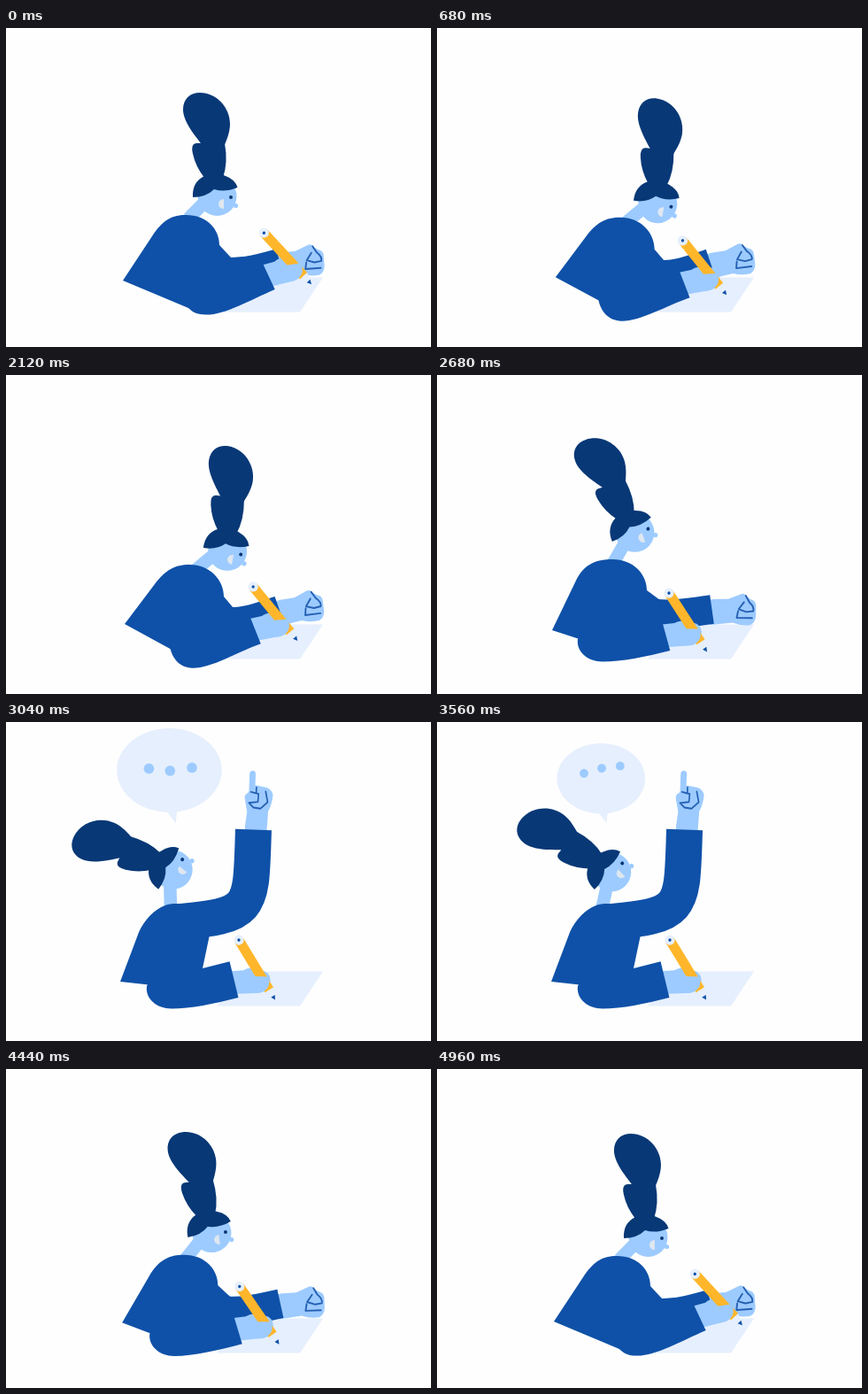
These frames come from a looping animation (480x360 px, 5000 ms). An HTML page:

```html
<!DOCTYPE html>
<html lang="en">
<head>
<meta charset="utf-8">
<title>Writing and raising a hand</title>
<style>
html, body { margin: 0; width: 100%; height: 100%; overflow: hidden; background: #fefefe; }
svg { display: block; width: 100vw; height: 100vh; }
.blue { fill: #0f51a8; }
.navy { fill: #083876; }
.skin { fill: #9dcbff; }
.pale { fill: #e6effd; }
.line { fill: none; stroke: #2560b2; stroke-width: 1.9; stroke-linecap: round; stroke-linejoin: round; }
</style>
</head>
<body>
<svg viewBox="0 0 480 360">
  <path class="pale" d="M265 281.5H358L332 320.5H238Z"/>

  <g id="bubble">
    <ellipse class="pale" cx="185.3" cy="63.8" rx="49.8" ry="39.8"/>
    <path class="pale" d="M179 98L191.5 114L193 98Z"/>
    <circle class="skin dot" cx="166" r="4.9"/>
    <circle class="skin dot" cx="186" r="4.9"/>
    <circle class="skin dot" cx="206.8" r="4.9"/>
  </g>

  <path id="neck" fill="none" stroke="#9dcbff" stroke-width="14.5"/>
  <g id="head">
    <circle class="skin" cx="238.5" cy="190" r="22"/>
    <circle class="skin" cx="259.5" cy="200.5" r="2.6"/>
    <path fill="#dfe7ef" d="M246 193V204A6 5.5 0 0 1 246 193Z"/>
    <circle class="navy" cx="254" cy="191" r="2"/>
    <path class="navy" d="M211 191Q210 174 224 167Q237 161 248 167Q259 171 261.5 180Q247 186 235 182Q226 191 211 191Z"/>
    <g id="hair" class="navy">
      <path d="M224 169Q214 156 211 142Q208 129 217 130L247 130Q251 152 245 169Z"/>
      <path d="M223 134C214 122 200 106 200 92C200 80 208 73 219 73C238 73 253 90 253 108C253 118 249 127 246 134Z"/>
    </g>
  </g>

  <g id="fist">
    <path id="finger" fill="none" stroke="#9dcbff" stroke-width="7.8" stroke-linecap="round"/>
    <path class="skin" d="M-4 -11H4L20 -9L35 -12.5Q39 -13.5 41 -9L45 -5Q50 -3 50 2L48 15Q46 22 40 23.5Q30 23 21 18L-4 17Z"/>
    <path id="curled" class="line" d="M40 -10L43 -2Q48 4 46 8.5L38 8.3L30 4L37 -3M29 6L26.4 13.3L43.5 16"/>
    <path id="pointing" class="line" d="M48 2L41 2M42.5 -5L40.5 5L31.5 4.5L30 -7L25 -1L24 8L31.5 17L43.5 14"/>
  </g>
  <path id="farArm" fill="none" stroke="#0f51a8"/>
  <path id="torso" class="blue"/>

  <g id="hand">
    <path class="skin" d="M252 282L268 280Q276 275 284 279Q294 278 298 285Q301 293 296 299Q292 305 283 305L262 307L250 300Z"/>
    <g transform="translate(304 309) rotate(55.7)">
      <rect x="-76" y="-5.5" width="66" height="11" fill="#ffb62a"/>
      <path class="pale" d="M-10 -5.5L-2 -2.4V2.4L-10 5.5Z"/>
      <path class="blue" d="M-2 -2.6L3 0L-2 2.6Z"/>
      <circle class="pale" cx="-76" r="5.6"/>
      <circle class="blue" cx="-76" r="1.7"/>
    </g>
    <path class="skin" d="M279 286L296 286Q300 293 296 299Q292 305 282 305Z"/>
  </g>
  <path id="nearArm" class="blue"/>
</svg>

<script>
const LOOP = 5000;
const $ = id => document.getElementById(id);
const dots = document.querySelectorAll('.dot');
const set = (id, name, value) => $(id).setAttribute(name, value);
const mix = (a, b, k) => a + (b - a) * k;
const mixPt = (a, b, k) => a.map((v, i) => mix(v, b[i], k));
const clamp = v => Math.min(1, Math.max(0, v));
const pt = (...v) => v.flat().map(n => n.toFixed(2)).join(' ');
const add = (p, x, y) => [p[0] + x, p[1] + y];
const polar = (deg, r) => [r * Math.cos(deg * Math.PI / 180), r * Math.sin(deg * Math.PI / 180)];

function turn([x, y], deg) {
  const [c, s] = polar(deg, 1);
  return [x * c - y * s, x * s + y * c];
}

// Smooth curve through [time, value] keys that never overshoots them
function track(keys) {
  const rate = i => (keys[i + 1][1] - keys[i][1]) / (keys[i + 1][0] - keys[i][0]);
  const slope = keys.map((k, i) => {
    if (i === 0 || i === keys.length - 1) return 0;
    const a = rate(i - 1), b = rate(i);
    return a * b > 0 ? 2 * a * b / (a + b) : 0;
  });
  return t => {
    let i = 0;
    while (i < keys.length - 2 && t > keys[i + 1][0]) i++;
    const [t0, v0] = keys[i], [t1, v1] = keys[i + 1];
    const h = t1 - t0, u = clamp((t - t0) / h), w = 1 - u;
    return v0 * w * w * (1 + 2 * u) + v1 * u * u * (3 - 2 * u)
      + h * u * w * (slope[i] * w - slope[i + 1] * u);
  };
}

const tilt = track([[0, 0], [420, 9.8], [610, 9.8], [1130, 0], [1500, 10], [2280, 10],
  [2680, -19.5], [2800, -37], [2980, -52], [3300, -43.5], [3960, -43.5],
  [4440, -8], [4650, -1.5], [5000, 0]]);
const sway = track([[2280, 0], [2680, 1.5], [2800, 1], [3040, -13], [3300, -7],
  [3700, -8.5], [3960, -8], [4200, 5], [4440, 1.5], [4700, 0]]);
const write = track([[0, 1], [360, 0], [390, 0], [940, 1], [1120, 1], [1470, 0],
  [1540, 0], [2020, 0.6], [2200, 0.6], [2560, 0], [4330, 0], [4980, 1]]);
const raise = track([[2690, 0], [2840, 0.3], [3080, 1.04], [3300, 1], [3970, 1], [4390, 0]]);

// Body points for four tilts of the head
const poses = [
  { a: 10, mid: [248.5, 193.5], back: [134, 281], blade: [168, 236], top: [207, 214],
    side: [246, 250], notch: [256, 262], base: [200, 317], nape: [214, 220] },
  { a: 0, mid: [236, 185], back: [132, 285], blade: [165, 235], top: [203, 211],
    side: [241, 245], notch: [254, 259], base: [206, 316], nape: [206, 215] },
  { a: -19.5, mid: [219.5, 174], back: [130, 288], blade: [157, 232], top: [198, 208],
    side: [237, 243], notch: [252, 254], base: [210, 314], nape: [198, 214] },
  { a: -43.5, mid: [192, 167.5], back: [129, 293], blade: [149, 240], top: [190, 205],
    side: [230, 240], notch: [222, 278], base: [220, 303], nape: [186, 212] }
];

function poseAt(a) {
  const i = a > 0 ? 0 : a > -19.5 ? 1 : 2;
  const p = poses[i], q = poses[i + 1];
  const k = (a - p.a) / (q.a - p.a), out = {};
  for (const key in p) if (key !== 'a') {
    out[key] = mixPt(p[key], q[key], key === 'mid' ? k : clamp(k));
  }
  return out;
}

function drawBody(b, a, swing) {
  const rise = [b.blade[0] - b.back[0], b.blade[1] - b.back[1]];
  set('torso', 'd', `M${pt(b.back)}L${pt(b.blade)}
    C${pt(add(b.blade, rise[0] * 0.36, rise[1] * 0.36), add(b.top, -16, 0), b.top)}
    C${pt(add(b.top, 24, 0), add(b.side, 0, -18), b.side)}
    L${pt(b.notch)}L${pt(b.base)}Z`);
  const jaw = turn([-14, 14], a);
  set('neck', 'd', `M${pt(add(b.mid, ...jaw))}L${pt(b.nape)}`);
  set('head', 'transform', `translate(${pt(b.mid)}) rotate(${a}) translate(-236 -185)`);
  set('hair', 'transform', `rotate(${swing} 236 172)`);
}

function drawNearArm(b, a, p) {
  const sit = clamp(-a / 43);
  const tip = [304 + 39 * p - 1.5 * sit, 309 - 22 * p + 2 * Math.sin(Math.PI * p) + 2 * sit];
  const r = -8.5 * p + 3 * sit;
  set('hand', 'transform', `translate(${pt(tip)}) rotate(${r}) translate(-304 -309)`);

  const cuffLow = add(tip, ...turn([-40, 2], r));
  const cuffTop = add(tip, ...turn([-52, -38], r));
  const half = 0.55;
  const seg = (x, y, z) => p < half ? mixPt(x, y, p / half) : mixPt(y, z, (p - half) / (1 - half));
  const lean = Math.max(0, a / 10);
  const elbow = add(seg([159, 298], [182, 305], [205, 315]), 0, -2 * lean);
  const low = add(seg([187, 323.5], [209, 326.5], [226, 323.5]), 0, 4.5 * lean);
  const dx = low[0] - elbow[0], dy = low[1] - elbow[1];
  set('nearArm', 'd', `M${pt(elbow)}
    C${pt(add(elbow, mix(-2, 5, p), dy * 0.55), add(low, -dx * 0.6, 0), low)}
    C${pt(add(low, 22, 0), add(cuffLow, -28, mix(7, 12, p)), cuffLow)}
    L${pt(cuffTop)}L${pt(b.notch)}L${pt(add(b.top, 0, 32))}Z`);
}

function drawFarArm(a, up, push) {
  const back = clamp((10 - a) / 29.5);
  const restAngle = mix(-16, -8, back);
  const restCuff = mixPt([309, 265.5], [310.5, 264.5], back);
  const arc = 4 * clamp(up) * (1 - clamp(up)) * push;

  const angle = mix(restAngle, -88, up);
  const reach = polar(angle, mix(51, 90, up));
  const restBend = add(restCuff, ...polar(restAngle, -51));
  const bend = add(mixPt(restBend, [276.4, 211.5], up), arc, arc * 0.4);
  const cuff = add(bend, ...reach);
  const start = mixPt([195, 240], [193, 226], up);
  const upper = mixPt(mixPt([238, 291], [230, 278], back), [281, 218], up);
  const sag = 3 * (1 - back) * (1 - clamp(up));

  set('farArm', 'd', `M${pt(start)}C${pt(upper, add(bend, 0, sag), cuff)}`);
  set('farArm', 'stroke-width', mix(33, 41, clamp(up)));
  set('fist', 'transform', `translate(${pt(cuff)}) rotate(${angle}) scale(1 ${mix(1, 0.88, clamp(up))})`);
  set('finger', 'd', `M34 -3.5H${mix(38, 62.5, clamp(up * 1.6 - 0.5))}`);
  set('curled', 'visibility', up < 0.5 ? 'visible' : 'hidden');
  set('pointing', 'visibility', up < 0.5 ? 'hidden' : 'visible');
}

function drawBubble(t) {
  const backOut = (u, s) => 1 + (s + 1) * (u - 1) ** 3 + s * (u - 1) ** 2;
  const size = t < 3600
    ? backOut(clamp((t - 2840) / 440), 2.6)
    : backOut(clamp((4340 - t) / 340), 1.35);
  const on = t > 2840 && t < 4340;
  set('bubble', 'visibility', on ? 'visible' : 'hidden');
  set('bubble', 'transform', `translate(190 113) scale(${Math.max(0, size)}) translate(-190 -113)`);
  dots.forEach((dot, i) => {
    const wave = Math.cos((t - 3560) / 800 * 2 * Math.PI + (2 - i) * 0.85);
    dot.setAttribute('cy', 57 - 7.3 * wave);
  });
}

function draw(now) {
  const t = now % LOOP;
  const a = tilt(t), b = poseAt(a);
  drawBubble(t);
  drawBody(b, a, sway(t));
  drawFarArm(a, raise(t), t < 3600 ? 10 : 32);
  drawNearArm(b, a, write(t));
}

const begin = performance.now();
function tick() {
  draw(performance.now() - begin);
  requestAnimationFrame(tick);
}
tick();
</script>
</body>
</html>
```
